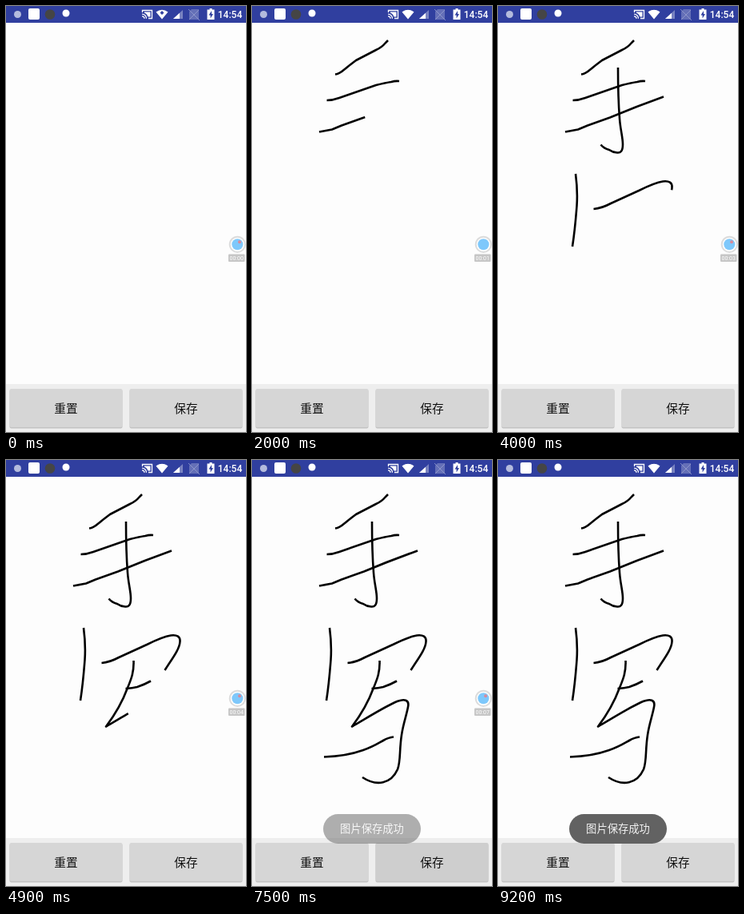
An HTML page that plays this animation: 300x533 px, repeating every 9400 ms.

```html
<!DOCTYPE html>
<html lang="zh-CN">
<head>
<meta charset="utf-8">
<title>手写</title>
<style>
html, body { margin: 0; width: 100%; height: 100%; overflow: hidden; background: #fdfdfd; }
svg { display: block; width: 300px; height: 533px; }
text { font-family: "Noto Sans CJK SC", "Noto Sans CJK", sans-serif; text-anchor: middle; }
#ink path { fill: none; stroke: #000; stroke-width: 2.6; stroke-linejoin: round; stroke-dasharray: 1 2; }
.button { font-size: 14.7px; font-weight: 500; fill: #111; }
.latin { font-family: Roboto, sans-serif; }
</style>
</head>
<body>
<svg viewBox="0 0 300 533">
  <rect width="300" height="533" fill="#fdfdfd"/>

  <!-- status bar -->
  <rect width="300" height="21" fill="#303f9f"/>
  <g fill="#fff">
    <circle cx="14.5" cy="10.5" r="4.5" fill="#b4bbdd"/>
    <rect x="28" y="3" width="14" height="14" rx="2"/>
    <circle cx="55" cy="10.5" r="6.3" fill="#454545"/>
    <circle cx="75" cy="9" r="4.5"/>
    <g fill="none" stroke="#fff" stroke-width="1.3">
      <path d="M170.5 8V5.5H182.5V15.5H178M170 10.2A5.5 5.5 0 0 1 175.5 15.7M170 12.8A3 3 0 0 1 173 15.8"/>
    </g>
    <path d="M173 7.5H180.5V13.5H177.5Q176 9.5 173 8.8Z"/>
    <path d="M187.5 7.5Q195 1.8 202.5 7.5L195 16.5Z"/>
    <path id="traffic" d="M195 6L197.5 8.5L195 11L192.5 8.5Z" fill="#303f9f"/>
    <path d="M221 5V16H209Z" opacity=".35"/>
    <path d="M217 8.7V16H209Z"/>
    <path d="M232 4H241V17H229V7Z" opacity=".25"/>
    <path d="M228 4L242 18M241 5L229 17" stroke="#98a0d0" stroke-width=".8"/>
    <path d="M254.5 3H257.5V4.5H260.5V17H251.5V4.5H254.5Z"/>
    <path d="M257 6L253.5 11.5H255.6V15.5L259 10H257Z" fill="#303f9f"/>
    <text class="latin" x="280" y="15" font-size="12" font-weight="500">14:54</text>
  </g>

  <g id="ink"></g>

  <!-- bottom buttons -->
  <rect y="473" width="300" height="60" fill="#eee"/>
  <g fill="#c3c3c3">
    <rect x="4.5" y="480" width="141" height="48.5" rx="2"/>
    <rect id="shadow" x="154.5" y="480" width="141" height="48.5" rx="2"/>
  </g>
  <g fill="#d6d6d6">
    <rect x="4.5" y="479" width="141" height="48" rx="2"/>
    <rect x="154.5" y="479" width="141" height="48" rx="2"/>
  </g>
  <rect id="ripple" x="154.5" y="479" width="141" height="48" rx="2" opacity="0"/>
  <text class="button" x="75" y="509">重置</text>
  <text class="button" x="225" y="509">保存</text>

  <!-- floating recorder -->
  <g id="recorder">
    <circle cx="289.3" cy="298.3" r="9.6" fill="#fff" stroke="#dcdcdc" stroke-width="2"/>
    <circle cx="289.3" cy="298.3" r="7" fill="#7ec8fb"/>
    <circle id="blink" cx="292" cy="295.2" r="2" fill="#d88a9c"/>
    <rect x="278" y="310.5" width="20.5" height="9.5" rx="1" fill="#c6c6c6"/>
    <text id="timer" class="latin" x="288.2" y="318" font-size="7" fill="#fff"></text>
  </g>

  <g id="toast">
    <rect x="89" y="443" width="122" height="37" rx="18.5" fill="#626262"/>
    <text x="150" y="466.3" font-size="13.3" fill="#f2f2f2">图片保存成功</text>
  </g>
</svg>
<script>
const LOOP = 9400, STEP = 100;
const $ = id => document.getElementById(id);
const clamp = v => Math.max(0, Math.min(1, v));
const ramp = (t, a, b) => clamp((t - a) / (b - a));
const within = (t, spans) => spans.some(([a, b]) => t >= a && t < b);
const show = (id, on) => $(id).setAttribute("opacity", +on);
const linear = u => u;
const easeOut = u => 1 - (1 - u) ** 2;

// pen strokes: start, end, path, easing
const strokes = [
  [500, 1200, "M170 43L167 46Q162 52 155 55L130 68Q122 74 116 79Q109 85 104 85.5"],
  [1400, 1700, "M93.5 118Q101 118 109 115L155 99Q167 96 174 95Q179 93.5 184 94"],
  [1900, 2117, "M84 157.5L100 154.5Q106 152 112 149.5L140 139.5Q172 126 207 113.5"],
  [2400, 3100, "M150 77C150 100 151 128 152 141C153 155 156 164 156 173C156 182 153 184 149 183.5Q143 183 139 180Q132 178 128.5 173.5", easeOut],
  [3300, 3600, "M97 210C99 225 99.5 235 98.5 250C97 270 95 288 93 301"],
  [3700, 4100, "M119.5 254Q130 253 141 247L176 231Q196 221 206 219.5C214 218.5 218 221 217.5 227C217 237 208 248 198.5 263"],
  [4200, 4400, "M149.5 286Q158 285.5 164 284Q173 281 181 276.5"],
  [4500, 5500, "M159.5 251C160 265 157 273 152 285C145 304 136 319 125 333.5C140 325 160 312 179 303C191 298 197 300 195 309C193 320 189 330 187 344C184 363 186 377 182 387C174 405 156 409 138 397"],
  [5600, 6000, "M90 371.5C108 371 125 368 139 363C151 359 157 355 164 351Q171 347 177 346.5"]
].map(([start, end, d, ease = linear]) => {
  const el = document.createElementNS("http://www.w3.org/2000/svg", "path");
  el.setAttribute("d", d);
  el.setAttribute("pathLength", 1);
  $("ink").append(el);
  return { start, end, ease, el };
});

const blinkOn = [[0, 200], [1000, 1300], [2100, 3500], [4000, 4400], [4800, 5300], [7000, 7700], [8100, 8400]];
const trafficOn = [[0, 200], [900, 1200], [2200, 2500], [3800, 4000], [5600, 6200], [7000, 7300], [9100, 9200]];

function draw(now) {
  const t = Math.floor((now % LOOP) / STEP) * STEP;
  for (const { start, end, ease, el } of strokes) {
    const part = ease(ramp(t, start, end));
    el.style.strokeDashoffset = 1 - part;
    el.style.visibility = part ? "visible" : "hidden";
  }
  show("blink", within(t, blinkOn));
  show("traffic", within(t, trafficOn));
  show("recorder", t < 9200);
  $("timer").textContent = "00:0" + Math.max(0, Math.floor((t - 50) / 1000));
  $("shadow").setAttribute("height", within(t, [[6600, 7500]]) ? 50.5 : 48.5);
  $("ripple").setAttribute("opacity", 0.04 * (ramp(t, 6800, 7000) - ramp(t, 7500, 7800)));
  $("toast").setAttribute("opacity", ramp(t, 7200, 7800));
  requestAnimationFrame(() => draw(performance.now() - origin));
}
const origin = performance.now();
draw(0);
</script>
</body>
</html>
```
